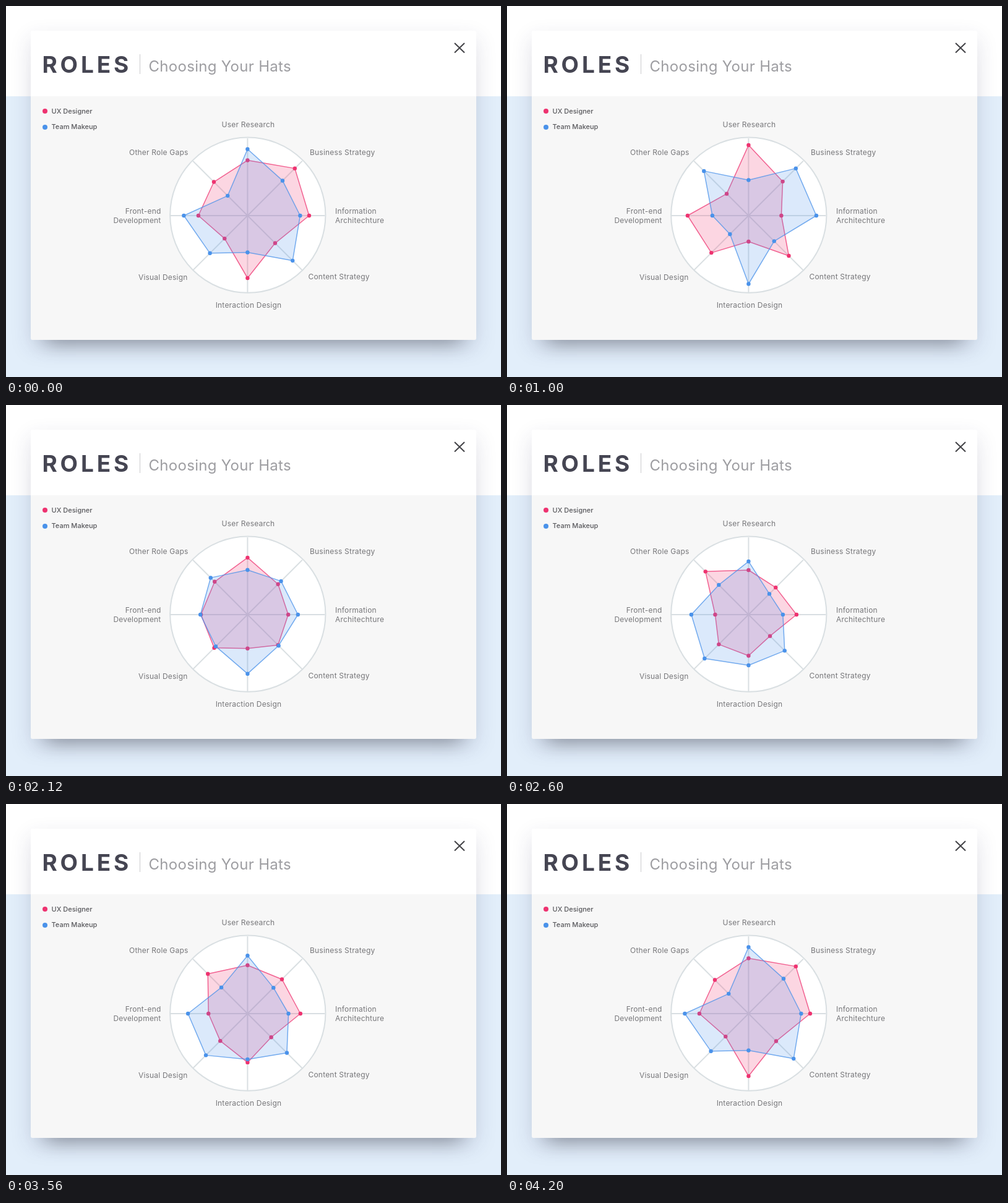
An HTML page that plays this animation: 800 px wide and 600 px high, repeating every 4.8 s.

```html
<!DOCTYPE html>
<html lang="en">
<head>
<meta charset="utf-8">
<title>Roles</title>
<style>
  html, body { margin: 0; width: 100%; height: 100%; overflow: hidden; }
  body { background: linear-gradient(#fff 146px, #e2eefa 146px); }
  .card {
    position: absolute; left: 40px; top: 40px; width: 720px; height: 500px;
    border-radius: 3px;
    background: linear-gradient(#fff 106px, #f7f7f7 106px);
    box-shadow: 0 13px 34px rgba(50, 50, 93, .15), 0 30px 30px -26px rgba(0, 0, 0, .36);
  }
  svg { position: absolute; left: 0; top: 0; display: block; }
  text { font-family: Inter, Lato, sans-serif; }
  .title { font-size: 37px; font-weight: 700; letter-spacing: 4.8px; fill: #454552; }
  .subtitle { font-size: 24px; letter-spacing: .3px; fill: #9d9da1; }
  .legend text { font-size: 11px; font-weight: 500; fill: #58585c; }
  .labels { font-size: 12px; letter-spacing: .2px; fill: #77777a; }
  .mid { text-anchor: middle; }
  .end { text-anchor: end; }
  .close { stroke: #434347; stroke-width: 2; }
  .grid { fill: #fff; stroke: #d9dfe2; stroke-width: 2; }
  .ux { --ink: #ee3370; }
  .team { --ink: #4a92ea; }
  .dot, .series circle { fill: var(--ink); }
  .series polygon {
    fill: var(--ink); fill-opacity: .2;
    stroke: var(--ink); stroke-opacity: .75; stroke-width: 1.5; stroke-linejoin: round;
  }
</style>
</head>
<body>
<div class="card"></div>
<svg width="800" height="600" viewBox="0 0 800 600">
  <text class="title" x="58.5" y="107.5">ROLES</text>
  <path d="M216.5 78V110" stroke="#cbcbce"/>
  <text class="subtitle" x="230.5" y="105.5">Choosing Your Hats</text>
  <path class="close" d="M725 60L741 75.5M741 60L725 75.5"/>

  <g class="legend">
    <circle class="dot ux" cx="63" cy="170" r="4"/>
    <text x="73.5" y="174">UX Designer</text>
    <circle class="dot team" cx="63" cy="196" r="4"/>
    <text x="73.5" y="199.3">Team Makeup</text>
  </g>

  <g class="grid"><circle cx="390.8" cy="338.2" r="125.6"/></g>

  <g class="labels">
    <text class="mid" x="391.5" y="196">User Research</text>
    <text x="491" y="241">Business Strategy</text>
    <text x="532" y="336">Information</text>
    <text x="532" y="351">Architechture</text>
    <text x="488.5" y="442">Content Strategy</text>
    <text class="mid" x="392" y="488">Interaction Design</text>
    <text class="end" x="293.5" y="443">Visual Design</text>
    <text class="end" x="250.5" y="336">Front-end</text>
    <text class="end" x="250.5" y="351">Development</text>
    <text class="end" x="294.5" y="241">Other Role Gaps</text>
  </g>

  <g class="series ux"><polygon/></g>
  <g class="series team"><polygon/></g>
</svg>
<script>
  // Scores along the eight spokes, clockwise from the top, for each of three poses.
  const scores = {
    ux: [
      [89.5, 108, 99.5, 63, 101, 52.5, 79.5, 77],
      [114, 78, 53, 92, 42, 85, 98.5, 50],
      [72, 62, 77.5, 49, 66.5, 68, 54, 98.5]
    ],
    team: [
      [107.5, 80, 85, 103, 59.5, 86, 103, 45.5],
      [57.5, 108, 109.5, 58.5, 110.5, 42.5, 58.5, 102],
      [86, 47.5, 55.5, 82.5, 82, 100.5, 92.5, 68]
    ]
  };
  const CX = 390.4, CY = 339, RIM = 125, SPOKES = 8;
  const LEG = 1600, MOVE = 1000, TICK = 40, LEAD = 16;

  function add(parent, tag, attrs) {
    const el = document.createElementNS('http://www.w3.org/2000/svg', tag);
    for (const key in attrs) el.setAttribute(key, attrs[key]);
    return parent.appendChild(el);
  }

  function onSpoke(i, r) {
    const angle = i * 2 * Math.PI / SPOKES;
    return [CX + r * Math.sin(angle), CY - r * Math.cos(angle)];
  }

  const grid = document.querySelector('.grid');
  for (let i = 0; i < SPOKES / 2; i++) {
    add(grid, 'path', { d: `M${onSpoke(i, RIM)}L${onSpoke(i, -RIM)}` });
  }

  const series = Object.entries(scores).map(([name, poses]) => {
    const group = document.querySelector('.series.' + name);
    const dots = poses[0].map(() => add(group, 'circle', { r: 3.2 }));
    return { poses, dots, shape: group.querySelector('polygon') };
  });

  function draw(ms) {
    // The chart steps 25 times a second; the lead covers one display refresh.
    const time = Math.floor((ms + LEAD) / TICK) * TICK;
    const leg = Math.floor(time / LEG);
    const mix = Math.min(time % LEG / MOVE, 1);
    for (const { poses, dots, shape } of series) {
      const from = poses[leg % poses.length];
      const to = poses[(leg + 1) % poses.length];
      const points = from.map((r, i) => onSpoke(i, r + (to[i] - r) * mix));
      shape.setAttribute('points', points.join(' '));
      points.forEach(([x, y], i) => {
        dots[i].setAttribute('cx', x);
        dots[i].setAttribute('cy', y);
      });
    }
  }

  const start = performance.now();
  function tick() {
    draw(performance.now() - start);
    requestAnimationFrame(tick);
  }
  tick();
</script>
</body>
</html>
```
